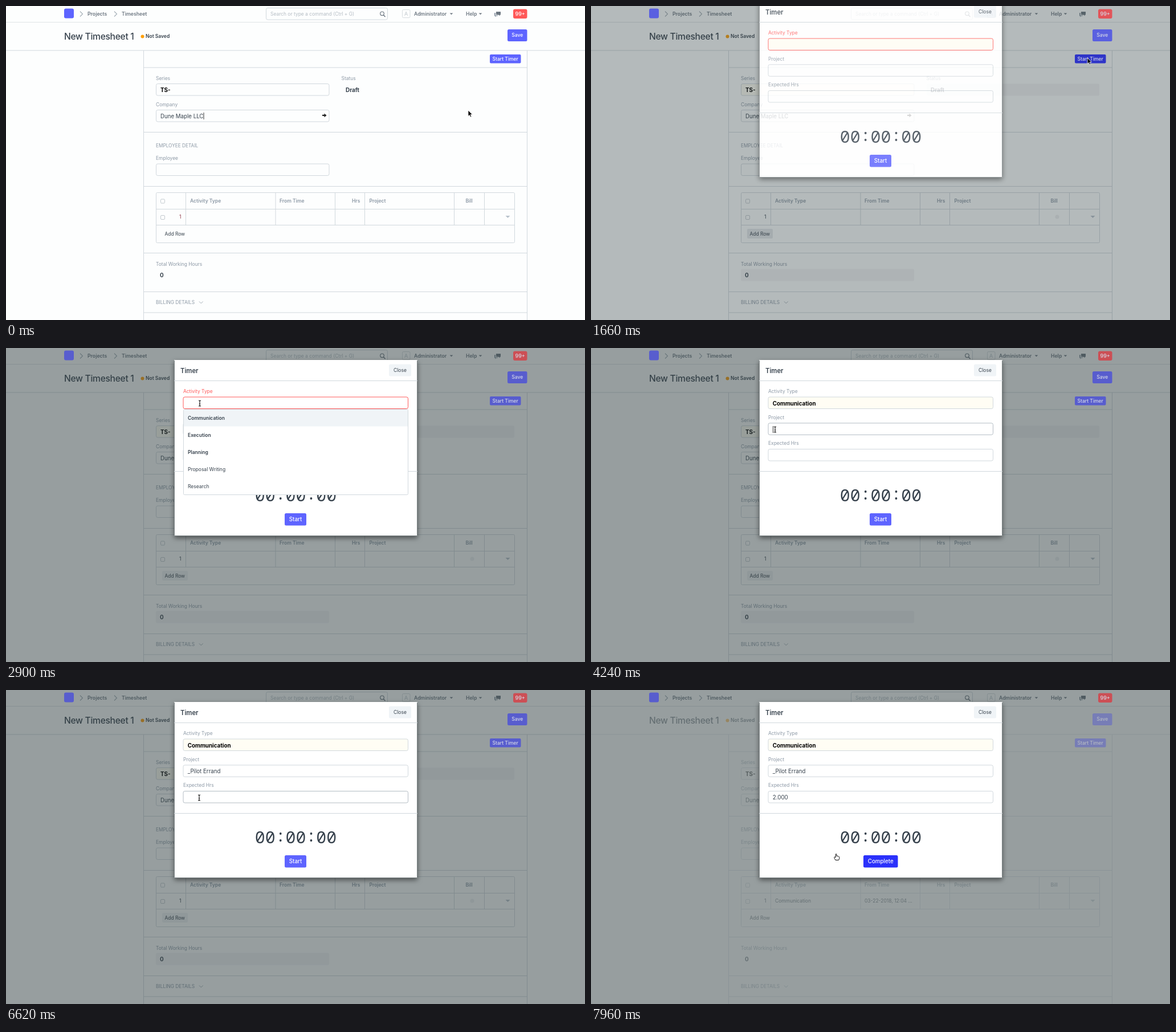
Recreate the animation shown at these times as an HTML page. Size 1016 by 551 pixels, loop 8 s.

```html
<!DOCTYPE html>
<html lang="en">
<head>
<meta charset="utf-8">
<title>Timesheet timer</title>
<style>
  html, body { margin: 0; width: 100%; height: 100%; overflow: hidden; background: #fdfefe; }
  svg { display: block; width: 1016px; height: 551px; font-family: Inter, "Open Sans", sans-serif; }
  text { white-space: pre; }
</style>
</head>
<body>
<svg id="stage" viewBox="0 0 1016 551" xmlns="http://www.w3.org/2000/svg"></svg>
<script>
const LOOP = 8000;
const PAPER = '#fdfefe', LINE = '#d1d8dd', MUTED = '#8d99a6', INK = '#36414c', BLUE = '#5e64ff', HOT = '#2b31fb';
const COMPANY = 'Dune Maple LLC', PROJECT = '_Pilot Errand';

// Moments at which the picture changes: first, last, number of steps
const bursts = [[300, 300, 1], [630, 1660, 8], [1810, 2750, 7], [2900, 3940, 8], [4090, 4240, 2],
  [4540, 5570, 8], [5720, 6020, 3], [6620, 7660, 8], [7810, 7960, 2]];
const ticks = [0];
for (const [from, to, n] of bursts)
  for (let i = 0; i < n; i++)
    ticks.push(n === 1 ? from : Math.floor((from + (to - from) * i / (n - 1)) / 10) * 10);

// Pointer path: time, x, y, shape
const path = [
  [0, 811, 183, 'arrow'], [480, 811, 183, 'arrow'], [1500, 871, 91, 'arrow'], [1820, 871, 91, 'arrow'],
  [2590, 340, 97, 'beam'], [3180, 340, 97, 'arrow'], [3480, 336, 121, 'arrow'], [3940, 336, 121, 'arrow'],
  [4240, 323, 143, 'beam'], [4690, 323, 143, 'arrow'], [5120, 346, 197, 'arrow'], [5570, 346, 197, 'arrow'],
  [6020, 339, 189, 'beam'], [6910, 339, 189, 'arrow'], [7210, 550, 355, 'arrow'], [7500, 510, 301, 'hand'],
  [7660, 510, 301, 'hand'], [7960, 431, 293, 'hand']];

const shapes = {
  arrow: '<path d="M0 0V10.5L2.4 8.3L4 12L5.8 11.2L4.2 7.6H7.4Z" fill="#000" stroke="#fff" stroke-width=".8"/>',
  beam: '<path d="M-2-5Q0-5 0-4Q0-5 2-5M0-4V4M-2 5Q0 5 0 4Q0 5 2 5M-1 1H1" fill="none" stroke="#111" stroke-width="1.1"/>',
  hand: '<path d="M-2 5.5L-4.2 1.5Q-4.5 0-3-.2L-1.8 1V-4.8Q-1-6.2 0-4.8V-1.6Q1.2-2.4 2-1.2Q3.2-1.8 3.6-.6Q4.8-.8 4.8.6V2.6L3.6 5.5Z" fill="#fff" stroke="#111"/>'
};

function pointer(t) {
  let i = path.length - 1;
  while (path[i][0] > t) i--;
  const a = path[i], b = path[i + 1] || a;
  const k = b === a ? 0 : (t - a[0]) / (b[0] - a[0]);
  const e = k * k * (3 - 2 * k);
  return `<g transform="translate(${a[1] + (b[1] - a[1]) * e} ${a[2] + (b[2] - a[2]) * e})">${shapes[a[3]]}</g>`;
}

const text = (x, y, str, size = 8.45, fill = MUTED, weight = 400, extra = '') =>
  `<text x="${x}" y="${y}" font-size="${size}" fill="${fill}" font-weight="${weight}" ${extra}>${str}</text>`;
const centered = (x, y, str, size, fill, weight) => text(x, y, str, size, fill, weight, 'text-anchor="middle"');
const rect = (x, y, w, h, fill, stroke = 'none', r = 0) =>
  `<rect x="${x}" y="${y}" width="${w}" height="${h}" fill="${fill}" stroke="${stroke}" rx="${r}"/>`;
const line = (d, stroke = LINE, w = 1) => `<path d="${d}" fill="none" stroke="${stroke}" stroke-width="${w}"/>`;
const tri = (x, y, r, fill) => `<path d="M${x - r} ${y}h${2 * r}l${-r} ${r}z" fill="${fill}"/>`;
const caret = (x, y) => line(`M${x} ${y}v12`, '#222', .9);
const field = (x, y, w, fill = PAPER, stroke = LINE) => rect(x + .5, y + .5, w, 20.5, fill, stroke, 2.8);

function navbar() {
  const item = (x, str) => text(x, 17, str, 8.7, '#6c7680', 600);
  return line('M0 28.5H1016', '#dfe4e6')
    + line('M130 9.5l4.5 4.5l-4.5 4.5M190 9.5l4.5 4.5l-4.5 4.5', '#a4aeb6', 1.1)
    + item(143, 'Projects') + item(203, 'Timesheet')
    + rect(456.5, 3.5, 213, 20.5, PAPER, LINE, 2.8)
    + text(464, 17.2, 'Search or type a command (Ctrl + G)', 8.45, '#b4bcc3')
    + '<circle cx="660" cy="13.3" r="3.3" fill="none" stroke="#6c7680" stroke-width="1.2"/>'
    + line('M662.5 16l3 3', '#6c7680', 1.5)
    + rect(695.5, 6.5, 13.5, 14, PAPER, '#d8dde0', 2) + centered(702.2, 17, 'A', 9, '#c0c7cd')
    + item(716, 'Administrator') + tri(781.5, 12.5, 2.8, '#6c7680')
    + item(807, 'Help') + tri(832.5, 12.5, 2.8, '#6c7680')
    + '<path d="M860 10h8v5.5h-1.5v2l-2-2H860z" fill="#6c7680"/>'
    + '<path d="M857 12h2v4.5h4v1h-2.500l-2 2v-2H857z" fill="#8d99a6"/>';
}

function form(s) {
  const shade = (x, y, w, h, c = '#f3f4f5') => s.shaded ? rect(x, y, w, h, c, 'none', 2) : '';
  const head = (x, str) => text(x, 344.5, str, 8.5, MUTED, 600);
  return text(102, 59, 'New Timesheet 1', 15.6, INK, 500, 'letter-spacing="-.3"')
    + '<circle cx="239.500" cy="53.500" r="3" fill="#ffa00a"/>'
    + text(245, 56.3, 'Not Saved', 8.5, INK, 600)
    + line('M0 78H1016M241.5 78V551M914.5 78V551')
    + [108, 221.5, 316.5, 433.5, 501.5, 538].map(y => line(`M242 ${y}H914`)).join('')
    + text(263, 130, 'Series') + field(263, 136, 303.5, s.shaded ? '#fffdf4' : PAPER)
    + text(271, 150.5, 'TS-', 9.9, '#000', 700)
    + text(588.5, 130, 'Status') + shade(589, 136.5, 303, 21)
    + text(596, 150.5, 'Draft', 9.9, INK, 700)
    + text(263, 175.5, 'Company') + field(263, 182, 303.5) + text(271, 196.8, COMPANY, 9.7, INK)
    + '<path d="M555 190.800h3.500v-2.300l4 3.400l-4 3.400v-2.300H555z" fill="#222"/>'
    + (s.t < 300 ? caret(347, 187) : '')
    + text(263, 247.5, 'EMPLOYEE DETAIL', 8.25)
    + text(263, 270.2, 'Employee') + field(263, 276.5, 303.5)
    + rect(263.5, 327.5, 629, 88, PAPER, LINE, 2)
    + line('M264 356.5H892M264 384.5H892')
    + [315.5, 473, 577.5, 629.5, 786.5, 839.5].map(x => line(`M${x} 328V384`)).join('')
    + [342.5, 371].map(y => rect(271.5, y - 3.5, 7, 7, PAPER, '#c3cacf', 1.5)).join('')
    + head(323, 'Activity Type') + head(480, 'From Time') + head(607, 'Hrs') + head(637.5, 'Project') + head(806.5, 'Bill')
    + text(304, 373, '1', 8.5, s.t < 1660 ? '#8a3040' : INK)
    + (s.logged ? text(323, 373, 'Communication', 8.5, INK) + text(480, 373, '03-22-2018, 12:04 ...', 8.5, INK) : '')
    + (s.shaded ? '<circle cx="818" cy="370" r="3.500" fill="#edeff1"/>' : '')
    + tri(880.5, 368, 4, '#b8c2cc')
    + shade(274, 391, 45, 17, s.t < 1810 ? '#e6e8ec' : '#f0f1f3') + text(278.5, 402.7, 'Add Row', 8.4, INK)
    + text(263, 455.5, 'Total Working Hours') + shade(263, 461.5, 304, 21)
    + text(270, 476, '0', 9.9, INK, 700)
    + text(263, 523.3, 'BILLING DETAILS', 8.35)
    + line('M339 518.5l3.3 3.3l3.3-3.3', '#a4aeb6');
}

// Coloured controls stay vivid while the page is dimmed
function accents(s) {
  const dim = s.t >= 1810, half = s.t >= 1660;
  const blue = dim ? '#585dce' : half ? '#5a60e0' : BLUE;
  const white = half ? '#d5d9e6' : '#fff';
  const hot = s.t >= 1360 && s.t < 1980 ? (half ? '#2f35c8' : HOT) : blue;
  return rect(102, 4.5, 17, 17, blue, 'none', 3)
    + rect(890, 5.500, 24.500, 16.500, dim ? '#cc4f55' : half ? '#e25459' : '#ff5858', 'none', 3)
    + centered(902.2, 17, '99+', 9, white, 500)
    + `<g opacity="${s.fade}">` + rect(880, 41, 34.5, 21, blue, 'none', 2.5) + centered(897.2, 54.3, 'Save', 8.5, white, 500)
    + rect(849, 85, 54.5, 15.5, hot, 'none', 2) + centered(876.2, 95.8, 'Start Timer', 8.5, white, 500) + '</g>';
}

function menu(y, items, active) {
  return rect(311.5, y, 394, 150, '#fff', LINE, 2)
    + rect(312, y + .5 + active * 30, 393, 29.500, '#f0f4f7')
    + items.map((str, i) => text(319, y + 18.5 + i * 30, str, 8.5, INK, i < 3 ? 600 : 400)).join('');
}

function modal(s) {
  const { t } = s, picked = t >= 3630, chosen = t >= 5420;
  const red = '#ff5858', at = (from, to) => t >= from && t < to;
  const hours = t >= 7660 ? '2.000' : t >= 6760 ? '2' : '';
  const idleTint = at(1660, 1810) || t >= 4240;
  const button = s.logged ? [478, 60.5, 'Complete'] : [489, 38, 'Start'];
  const edge = on => on ? '#b3bcc3' : LINE;
  return `<g filter="url(#shadow)">${rect(295, 21, 427, 309, '#fff', 'none', 2)}</g>`
    + line('M295.500 22V329.500H721.500V22', '#5e6869', .8)
    + text(306, 44.2, 'Timer', 11.2, INK, 600)
    + (at(1810, 1980) ? '' : rect(672, 28.5, 39, 21, '#f0f4f7', 'none', 2.5))
    + centered(691.5, 42.2, 'Close', 8.5, INK)
    + line('M295 57.500H722M295 216.500H722')
    + text(311, 79.2, 'Activity Type', 8.4, picked ? MUTED : red)
    + field(310.5, 85.5, 394.5, idleTint ? '#fffdf4' : '#fff', picked ? edge(t < 4240) : red)
    + (picked ? text(318.7, 100.5, 'Communication', 9.8, '#000', 700) : '')
    + text(311, 124.7, 'Project')
    + field(310.5, 131.3, 394.5, '#fff', edge(at(4240, 5870)))
    + (chosen ? text(318.7, 146.2, PROJECT, 9.7, INK) : '')
    + text(311, 170.4, 'Expected Hrs')
    + field(310.5, 177, 394.5, '#fff', edge(at(6020, 7660)))
    + text(318.7, 191.8, hours, 9.8, INK)
    + '<text x="508.500" y="269" font-size="29.860" text-anchor="middle" fill="' + INK
    + '" style="font-family:\'Noto Sans Mono\',\'DejaVu Sans Mono\',monospace">00<tspan dy="-3">:</tspan><tspan dy="3">00</tspan><tspan dy="-3">:</tspan><tspan dy="3">00</tspan></text>'
    + rect(button[0], 290, button[1], 21.5, t >= 7500 ? HOT : BLUE, 'none', 2.5)
    + centered(button[0] + button[1] / 2, 304.3, button[2], 9.8, '#fff', 500)
    + (at(2750, 2900) ? caret(319.5, 91) : '')
    + (at(3630, 4090) ? caret(397.5, 91) : '')
    + (at(4240, 4830) ? caret(319.5, 137) : '')
    + (at(5420, 5870) ? caret(377.5, 137) : '')
    + (at(6020, 6620) ? caret(319.5, 182) : '')
    + (at(6760, 7060) ? caret(325.5, 182) : '')
    + (at(2900, 3630) ? menu(107.5, ['Communication', 'Execution', 'Planning', 'Proposal Writing', 'Research'], 0) : '')
    + (at(4540, 5420) ? menu(152.5, ['_Sample Errand', PROJECT, '_Spare Errand', '+ Create a new Project', 'Advanced Search'], t < 4980 ? 0 : 1) : '');
}

function draw(t) {
  const s = {
    t,
    shaded: t >= 1660 && t < 7810,
    logged: t >= 7810,
    fade: t >= 7960 ? .5 : t >= 7810 ? .75 : 1
  };
  const opening = t < 1810, top = opening ? -8 : 21;
  let out = '<defs><filter id="shadow" x="-10%" y="-10%" width="120%" height="120%">'
    + '<feDropShadow dx="0" dy="3.500" stdDeviation="4.500" flood-color="#000" flood-opacity=".5"/></filter></defs>'
    + rect(0, 0, 1016, 551, PAPER) + navbar() + `<g opacity="${s.fade}">${form(s)}</g>`;
  if (t >= 1660)
    out += `<path d="M0 0H1016V551H0ZM295 ${top}H722v309H295Z" fill="#334143" fill-rule="evenodd" opacity="${opening ? .36 : .5}"/>`;
  out += accents(s);
  if (t >= 1660)
    out += `<g transform="translate(0 ${top - 21})" opacity="${opening ? .82 : 1}">${modal(s)}</g>`;
  stage.innerHTML = out + pointer(t);
}

const stage = document.getElementById('stage');
const start = performance.now();
let shown = -1;
function frame() {
  const t = (performance.now() - start) % LOOP;
  const tick = ticks.filter(v => v <= t).pop();
  if (tick !== shown) draw(shown = tick);
  requestAnimationFrame(frame);
}
frame();
</script>
</body>
</html>
```
